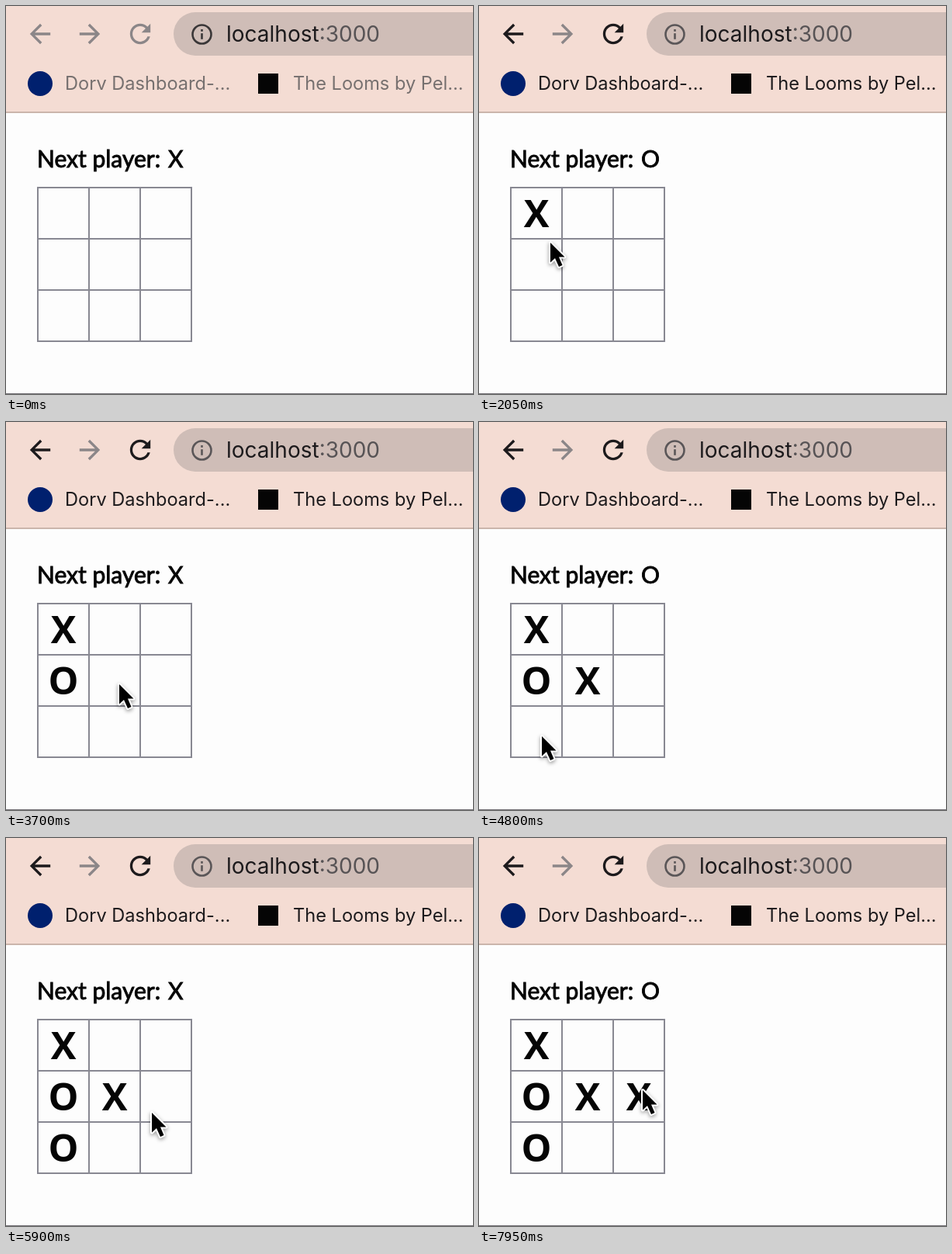
An HTML page with a canvas that plays this animation: 602x500 px, repeating every 8 s.

```html
<!DOCTYPE html>
<html lang="en">
<head>
<meta charset="utf-8">
<title>Noughts and crosses</title>
<style>
  html, body { margin: 0; width: 100%; height: 100%; overflow: hidden; background: #fdfdfd; }
  canvas { display: block; width: 602px; height: 500px; }
</style>
</head>
<body>
<canvas id="stage" width="602" height="500"></canvas>
<script>
const ctx = document.getElementById('stage').getContext('2d');
const LOOP = 8000, STEP = 50, FOCUS = 650;
const BLACK = '#050505', GREY = '#8b8688', LINE = '#888892';

const BACK = new Path2D('M20 11H7.83l5.59-5.59L12 4l-8 8 8 8 1.41-1.41L7.83 13H20z');
const RELOAD = new Path2D('M17.65 6.35C16.2 4.9 14.21 4 12 4c-4.42 0-7.99 3.58-7.99 8s3.57 8 7.99 8c3.73 0 6.84-2.55 7.73-6h-2.08c-.82 2.33-3.04 4-5.65 4-3.31 0-6-2.69-6-6s2.69-6 6-6c1.66 0 3.14.69 4.22 1.78L13 11h7V4z');
const POINTER = new Path2D('M0 0V25.5L6 20L11 31L15.5 29L11 18.5H18.5Z');

// Moves in order of play: time, column, row
const MOVES = [[1200, 0, 0], [2750, 0, 1], [3950, 1, 1], [5050, 0, 2], [6600, 2, 1]];

// Pointer stops: time, x, y
const TRACK = [
  [100, 610, 420], [600, 59, 260], [1700, 59, 260], [2050, 92, 305],
  [2350, 78, 330], [3000, 78, 330], [3500, 146, 338], [4200, 146, 338],
  [4650, 81, 405], [5400, 81, 405], [5900, 188, 354], [6300, 211, 325],
  [8000, 211, 325]
];

const slope = (a, b, axis) => (b[axis] - a[axis]) / (b[0] - a[0]);

// Speed through stop i: zero at rests and turns, steady elsewhere
function speed(i, axis) {
  if (i === 0 || i === TRACK.length - 1) return 0;
  const before = slope(TRACK[i - 1], TRACK[i], axis);
  const after = slope(TRACK[i], TRACK[i + 1], axis);
  return before * after > 0 ? 2 * before * after / (before + after) : 0;
}

function pointerAt(t) {
  if (t < TRACK[0][0]) return null;
  const i = TRACK.findIndex(k => k[0] > t);
  const a = TRACK[i - 1], b = TRACK[i];
  const span = b[0] - a[0], u = (t - a[0]) / span, v = 1 - u;
  return [1, 2].map(axis =>
    v * v * (1 + 2 * u) * a[axis] + u * u * (1 + 2 * v) * b[axis] +
    span * u * v * (v * speed(i - 1, axis) - u * speed(i, axis)));
}

function text(s, x, y, font, color) {
  ctx.font = font;
  ctx.fillStyle = color;
  ctx.fillText(s, x, y);
}

function rect(x, y, w, h, color) {
  ctx.fillStyle = color;
  ctx.fillRect(x, y, w, h);
}

function disc(x, y, r, color) {
  ctx.fillStyle = color;
  ctx.beginPath();
  ctx.arc(x, y, r, 0, Math.PI * 2);
  ctx.fill();
}

function icon(path, x, y, color, flip = 1) {
  ctx.save();
  ctx.translate(x, y);
  ctx.scale(1.65 * flip, 1.65);
  ctx.translate(-12, -12);
  ctx.fillStyle = color;
  ctx.fill(path);
  ctx.restore();
}

function drawToolbar(active) {
  const ink = active ? '#1c1a1c' : GREY;
  const label = active ? '#1c1a1c' : '#76706f';
  const info = active ? '#5a5658' : '#3a3738';
  rect(0, 0, 602, 136, '#f4dcd3');
  rect(0, 136, 602, 2, '#cbb5ab');

  ctx.fillStyle = '#cfbdb7';
  ctx.beginPath();
  ctx.roundRect(216, 8, 420, 56, 28);
  ctx.fill();

  icon(BACK, 44, 36, ink);
  icon(BACK, 108, 36, GREY, -1);
  icon(RELOAD, 173, 36, ink);

  ctx.strokeStyle = info;
  ctx.lineWidth = 2.6;
  ctx.beginPath();
  ctx.arc(252.5, 36.5, 12, 0, Math.PI * 2);
  ctx.stroke();
  rect(251.2, 30, 2.6, 2.8, info);
  rect(251.2, 35.2, 2.6, 7.6, info);

  const url = '28px Inter, sans-serif';
  text('localhost', 284, 46, url, '#1c1a1c');
  const w = ctx.measureText('localhost').width;
  text(':3000', 284 + w, 46, url, '#575355');

  const small = '23.6px Inter, sans-serif';
  disc(44, 100, 16, '#00206e');
  text('Dorv Dashboard-...', 76, 108, small, label);
  rect(325, 87, 26, 26, BLACK);
  text('The Looms by Pel...', 370, 108, small, label);
}

function drawBoard(played) {
  const font = '30px Lato, sans-serif';
  const next = played % 2 ? 'O' : 'X';
  ctx.strokeStyle = BLACK;
  ctx.lineWidth = 0.9;
  for (const [s, x] of [['Next player:', 40], [next, 209]]) {
    text(s, x, 208, font, BLACK);
    ctx.strokeText(s, x, 208);
  }

  for (let i = 0; i < 4; i++) {
    rect(40 + 66 * i, 233, 2, 200, LINE);
    rect(40, 233 + 66 * i, 200, 2, LINE);
  }

  ctx.textAlign = 'center';
  MOVES.slice(0, played).forEach(([, col, row], i) =>
    text(i % 2 ? 'O' : 'X', 74 + 66 * col, 285 + 66 * row,
      'bold 49px "Open Sans", "Noto Sans", sans-serif', BLACK));
  ctx.textAlign = 'left';
}

function drawPointer([x, y]) {
  ctx.save();
  ctx.translate(x, y);
  ctx.lineJoin = 'round';
  ctx.lineWidth = 4;
  ctx.strokeStyle = '#fff';
  ctx.shadowColor = 'rgba(0, 0, 0, .4)';
  ctx.shadowBlur = 5;
  ctx.shadowOffsetY = 2;
  ctx.stroke(POINTER);
  ctx.shadowColor = 'transparent';
  ctx.fillStyle = '#000';
  ctx.fill(POINTER);
  ctx.restore();
}

function draw(now) {
  const t = Math.floor((now % LOOP) / STEP) * STEP;
  rect(0, 0, 602, 500, '#fdfdfd');
  drawToolbar(t >= FOCUS);
  drawBoard(MOVES.filter(m => m[0] <= t).length);
  rect(0, 499, 602, 1, '#77757a');
  const p = pointerAt(t);
  if (p) drawPointer(p);
}

function loop() {
  draw(performance.now());
  requestAnimationFrame(loop);
}
loop();
</script>
</body>
</html>
```
